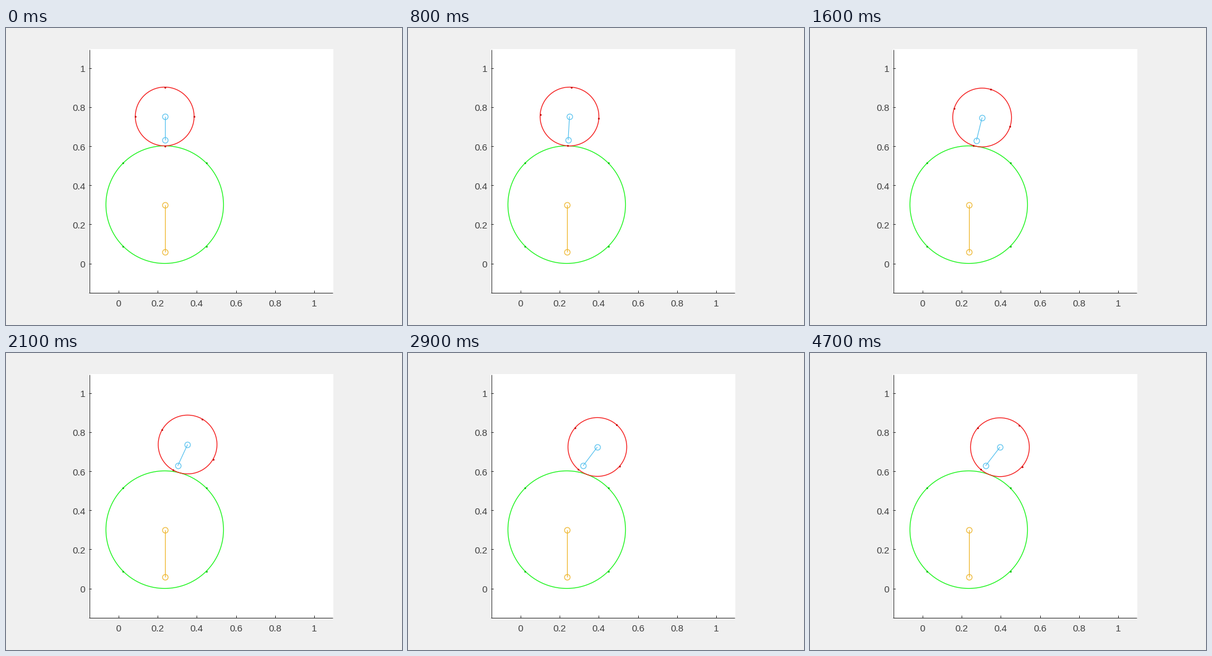
Recreate the animation shown at these times as a matplotlib script. Size 640 px wide and 480 px high, loop 4.9 s.

```python
import numpy as np
import matplotlib.pyplot as plt
from matplotlib.animation import FuncAnimation
from matplotlib.patches import Rectangle

W, H, DPI = 640, 480, 100
PX = 72 / DPI  # points per pixel
STEP, FRAMES = 100, 49

RED, DARK_RED = "#f41818", "#c81010"
GREEN, DARK_GREEN = "#18f418", "#10c410"
BLUE, ORANGE = "#4dbeee", "#edb120"
INK, LABEL = "#303030", "#404040"
BIG = np.array([256.5, 285.5])
R_BIG, R_SMALL, ROD = 95, 47.5, 38

# Lean of the upper wheel around the lower one, and swing of its rod (radians)
LEAN_T = [0, 300, 600, 800, 1200, 1600, 1800, 2100, 2400, 2900, 3400, 3700, 4700]
LEAN = [0, .004, .0155, .0316, .080, .1526, .198, .2626, .307, .355, .367, .3675, .362]
SWING_T = [0, 400, 800, 1200, 1600, 2100, 2400, 2900, 3300, 3700, 4700]
SWING = [0, .013, .058, .134, .242, .434, .532, .648, .672, .674, .657]


def smooth(t, times, values):
    """Cubic Hermite curve through the given points."""
    times, values = np.array(times, float), np.array(values)
    slopes = np.gradient(values, times)
    i = min(np.searchsorted(times, t, side="right") - 1, len(times) - 2)
    h = times[i + 1] - times[i]
    u = (t - times[i]) / h
    return ((1 + 2 * u) * (1 - u) ** 2 * values[i] + u * (1 - u) ** 2 * h * slopes[i]
            + u * u * (3 - 2 * u) * values[i + 1] + u * u * (u - 1) * h * slopes[i + 1])


def around(center, radius, angles):
    """Points on a circle, angles clockwise from the top."""
    return center[0] + radius * np.sin(angles), center[1] - radius * np.cos(angles)


fig = plt.figure(figsize=(W / DPI, H / DPI), dpi=DPI, facecolor="#f0f0f0")
ax = fig.add_axes([0, 0, 1, 1])
ax.set(xlim=(0, W), ylim=(H, 0))
ax.axis("off")


def line(xs, ys, color, width=1.0, **style):
    return ax.plot(xs, ys, color=color, lw=width * PX, solid_capstyle="butt", **style)[0]


def wheel(color, dot_color):
    rim = line([], [], color, 1.3)
    dots = line([], [], dot_color, 0, marker="o", ms=3 * PX, mew=0)
    return rim, dots


def rod(color):
    return line([], [], color, 1.1, marker="o", ms=9 * PX, mfc="none", mew=1.1 * PX)


def place_wheel(parts, center, radius, turn):
    parts[0].set_data(*around(center, radius, np.linspace(0, 2 * np.pi, 181)))
    parts[1].set_data(*around(center, radius, turn + np.arange(4) * np.pi / 2))


ax.add_patch(Rectangle((134, 34), 395, 394, fc="white", lw=0))
line([134.5, 134.5], [35, 428], INK)
line([134, 528], [427.5, 427.5], INK)

font = dict(family="Liberation Sans", size=15.2 * PX, color=LABEL)
for k in range(6):
    x, y = 181.8 + 63.3 * k, 380.5 - 63.2 * k
    line([x, x], [424, 428], INK)
    line([134, 138], [y, y], INK)
    label = f"{k / 5:g}"
    ax.text(x, 445.5, label, ha="center", va="center", **font)
    ax.text(128, y + 2.7, label, ha="right", va="center", **font)

place_wheel(wheel(GREEN, DARK_GREEN), BIG, R_BIG, np.pi / 4)
rod(ORANGE).set_data([256.5, 256.5], [285.5, 362])
small_wheel = wheel(RED, DARK_RED)
small_rod = rod(BLUE)


def update(frame):
    t = min(frame, FRAMES - 2) * STEP
    lean, swing = smooth(t, LEAN_T, LEAN), smooth(t, SWING_T, SWING)
    center = around(BIG, R_BIG + R_SMALL, lean)
    place_wheel(small_wheel, center, R_SMALL, 2 * lean)
    tip = around(center, ROD, np.pi + swing)
    small_rod.set_data(*zip(center, tip))
    return (*small_wheel, small_rod)


anim = FuncAnimation(fig, update, frames=FRAMES, interval=STEP,
                     repeat=True, repeat_delay=0)
plt.show()
```
